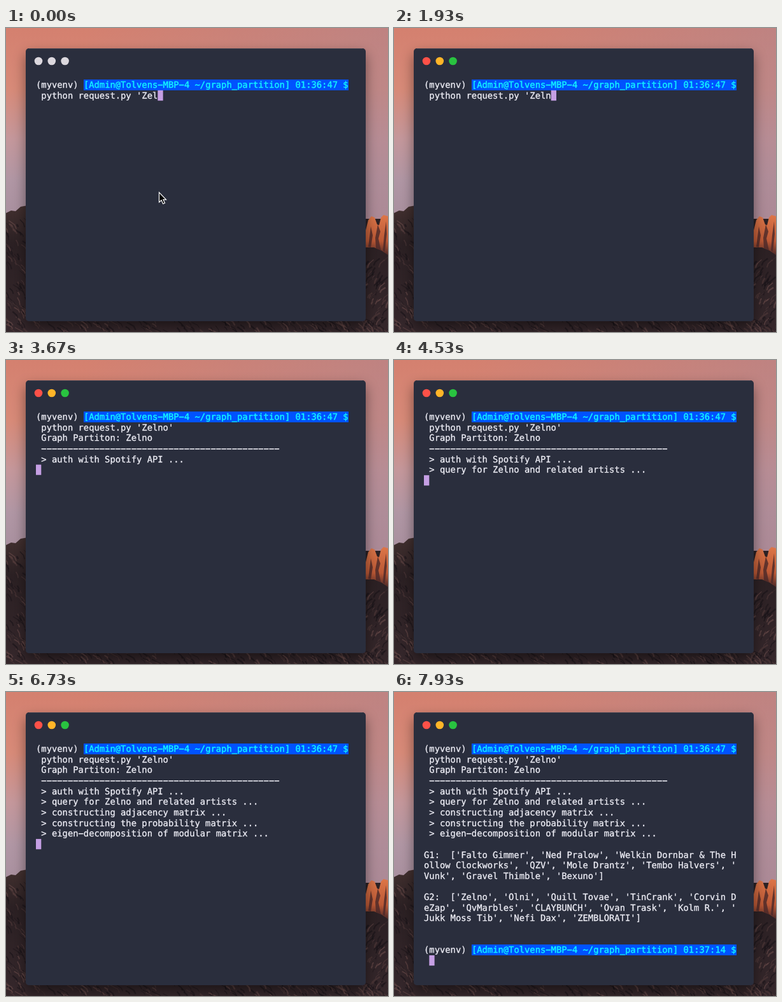
An HTML page that plays this animation: 600x478 px, repeating every 8 s.

```html
<!DOCTYPE html>
<html lang="en">
<head>
<meta charset="utf-8">
<title>Graph partition in a terminal</title>
<style>
  html, body { margin: 0; width: 100%; height: 100%; overflow: hidden; background: #2c2124; }
  svg { display: block; width: 600px; height: 478px; }
  text {
    font: 13.82px "DejaVu Sans Mono", monospace; white-space: pre; text-rendering: geometricPrecision;
    fill: #efeff7; stroke: #efeff7; stroke-width: .3px;
  }
  .prompt { fill: #12f0ff; stroke: #12f0ff; stroke-width: .45px; }
</style>
</head>
<body>
<svg id="stage" viewBox="0 0 600 478">
  <defs>
    <linearGradient id="sky" x2="0" y2="1">
      <stop offset="0" stop-color="#d4806f"/>
      <stop offset=".32" stop-color="#d78a78"/>
      <stop offset=".58" stop-color="#c4979b"/>
      <stop offset=".8" stop-color="#b096a4"/>
      <stop offset="1" stop-color="#a8909f"/>
    </linearGradient>
    <linearGradient id="dusk" x2="1" y2=".25">
      <stop offset=".2" stop-color="#b0858f" stop-opacity="0"/>
      <stop offset="1" stop-color="#ae8590" stop-opacity=".6"/>
    </linearGradient>
    <linearGradient id="rock" x2="0" y2="1">
      <stop offset="0" stop-color="#42302f"/>
      <stop offset=".3" stop-color="#2b2023"/>
      <stop offset="1" stop-color="#35272b"/>
    </linearGradient>
    <linearGradient id="cliff" x2="0" y2="1">
      <stop offset="0" stop-color="#dd7648"/>
      <stop offset=".65" stop-color="#bb5835"/>
      <stop offset="1" stop-color="#4c2927"/>
    </linearGradient>
    <filter id="shadow" x="-20%" y="-20%" width="140%" height="140%">
      <feDropShadow dx="0" dy="9" stdDeviation="10" flood-color="#000" flood-opacity=".45"/>
    </filter>
  </defs>
  <rect width="600" height="300" fill="url(#sky)"/>
  <rect width="600" height="300" fill="url(#dusk)"/>
  <path fill="url(#rock)" d="M0 291L8 287 15 288 23 281 34 279 120 330 480 340 566 342 600 349V478H0Z"/>
  <g id="streaks" fill="none"></g>
  <path fill="url(#cliff)" d="M560 345L565 318 569 302 574 296 579 298 583 309 586 310 589 298 593 294 600 296V357L590 350 578 345Z"/>
  <path fill="#4a2829" opacity=".8" d="M584 309L588 320 585 331 589 350 581 346 580 330ZM573 312L576 326 573 345 569 344ZM597 304L598 324 595 352 592 350 594 326Z"/>
  <rect x="31" y="32" width="534" height="429" rx="5" fill="#2a2e3e" filter="url(#shadow)"/>
  <path d="M36 32.5H560" stroke="#4a4d5b" stroke-width=".7"/>
  <g id="buttons"></g>
  <rect id="cursor" width="8.3" height="16.2" fill="#c59fe4"/>
  <g id="screen"></g>
  <path id="arrow" d="M0 0V15.5L3.6 12.2 6.2 18 9 16.8 6.4 11.3H11Z" fill="#000" stroke="#fff" stroke-width="1.2"/>
  <g id="beam" fill="none">
    <path d="M-4 -8.5Q0 -8.5 0 -5.5V5.5Q0 8.5 -4 8.5M4 -8.5Q0 -8.5 0 -5.5V5.5Q0 8.5 4 8.5M-2 2H2" stroke="#9da0aa" stroke-width="2.4"/>
    <path d="M-4 -8.5Q0 -8.5 0 -5.5V5.5Q0 8.5 -4 8.5M4 -8.5Q0 -8.5 0 -5.5V5.5Q0 8.5 4 8.5M-2 2H2" stroke="#0b0c11" stroke-width="1.2"/>
  </g>
</svg>
<script>
const LOOP = 8000, COLS = 59, LEFT = 47, TOP = 81.4, CHAR = 8.32, ROW = 16.63;
const FOCUS = 400, HIDE_POINTER = 1530, ENTER = 2730, RESULT = 7530;
const $ = id => document.getElementById(id);

function add(parent, tag, attrs, content = '') {
  const el = document.createElementNS('http://www.w3.org/2000/svg', tag);
  for (const key in attrs) el.setAttribute(key, attrs[key]);
  el.textContent = content;
  parent.append(el);
  return el;
}
const show = (el, on) => el.setAttribute('visibility', on ? 'visible' : 'hidden');

// Veins and cracks on the rock faces
let seed = 17;
const random = () => (seed = seed * 16807 % 2147483647) / 2147483647;
function streaks(count, x, y, w, h, slope) {
  for (let i = 0; i < count; i++) {
    const length = 4 + random() * 9;
    const dx = slope * length * (.4 + random());
    add($('streaks'), 'path', {
      d: `M${x + random() * w} ${y + random() * h}l${dx} ${length * .5}l${dx * .3} ${length * .5}`,
      stroke: ['#171217', '#1d161b', '#6a4c4b', '#513a3b'][Math.floor(random() * 4)],
      'stroke-width': .7 + random() * 1.8,
      opacity: .6
    });
  }
}
streaks(75, -3, 298, 34, 175, .6);
streaks(60, 564, 358, 38, 112, -.6);
streaks(170, 0, 456, 600, 20, .8);

const buttons = ['#fe5148', '#ffb528', '#29c340'].map((color, i) =>
  ({ color, el: add($('buttons'), 'circle', { cx: 51 + i * 20.8, cy: 52, r: 6.3 }) }));

// Hyphens are drawn at the wide terminal weight
const wide = s => s.replaceAll('-', '\u2212');
const put = (parent, row, col, s, cls = '') => add(parent, 'text',
  { x: LEFT + col * CHAR, y: TOP + 12.8 + row * ROW, class: cls }, wide(s));

const lines = [];
function line(time, row, s) {
  const g = add($('screen'), 'g', {});
  put(g, row, 0, s);
  lines.push({ time, g });
}
function prompt(time, row, clock) {
  const g = add($('screen'), 'g', {});
  const label = `[Admin@Tolvens-MBP-4 ~/graph_partition] ${clock} $`;
  add(g, 'rect', {
    x: LEFT + 9 * CHAR, y: TOP + row * ROW, width: label.length * CHAR, height: ROW,
    fill: '#0052ff', 'shape-rendering': 'crispEdges'
  });
  put(g, row, 0, '(myvenv)');
  put(g, row, 9, label, 'prompt');
  lines.push({ time, g });
}
function wrapped(time, row, s) {
  for (let i = 0; i < s.length; i += COLS) line(time, row++, s.slice(i, i + COLS));
}
const group = (name, members) => `${name}:  [${members.map(m => `'${m}'`).join(', ')}]`;

prompt(0, 0, '01:36:47');
const command = put($('screen'), 1, 0, '');
line(3200, 2, ' Graph Partiton: Zelno');
line(3200, 3, ' ' + '-'.repeat(45));
line(3270, 4, ' > auth with Spotify API ...');
line(4130, 5, ' > query for Zelno and related artists ...');
line(5000, 6, ' > constructing adjacency matrix ...');
line(5930, 7, ' > constructing the probability matrix ...');
line(6330, 8, ' > eigen-decomposition of modular matrix ...');
wrapped(RESULT, 10, group('G1', ['Falto Gimmer', 'Ned Pralow',
  'Welkin Dornbar & The Hollow Clockworks', 'QZV', 'Mole Drantz', 'Tembo Halvers',
  'Vunk', 'Gravel Thimble', 'Bexuno']));
wrapped(RESULT, 14, group('G2', ['Zelno', 'Olni', 'Quill Tovae', 'TinCrank', 'Corvin DeZap',
  'QvMarbles', 'CLAYBUNCH', 'Ovan Trask', 'Kolm R.', 'Jukk Moss Tib', 'Nefi Dax', 'ZEMBLORATI']));
prompt(RESULT, 19, '01:37:14');

const fullCommand = " python request.py 'Zelno'";
const keyTimes = [1730, 2130, 2400];
// time, row, column of the block cursor once the command runs
const cursorSteps = [[ENTER, 2, 0], [3200, 4, 0], [3270, 5, 0], [4130, 6, 0], [5000, 7, 0],
  [5930, 8, 0], [6330, 9, 0], [RESULT, 20, 1]];

function draw(t) {
  const typed = fullCommand.slice(0, fullCommand.length - 3 + keyTimes.filter(k => t >= k).length);
  if (command.textContent !== typed) command.textContent = typed;
  for (const { time, g } of lines) show(g, t >= time);

  const [, row, col] = cursorSteps.findLast(step => t >= step[0]) || [0, 1, typed.length];
  $('cursor').setAttribute('x', LEFT + col * CHAR);
  $('cursor').setAttribute('y', TOP + row * ROW);

  const focused = t >= FOCUS;
  for (const { el, color } of buttons) el.setAttribute('fill', focused ? color : '#dcd8de');

  const p = Math.min(1, Math.max(0, (t - 470) / 400));
  const ease = p * p * (3 - 2 * p);
  const place = `translate(${240.5 - 4.5 * ease} ${258.5 - 65.5 * ease})`;
  $('arrow').setAttribute('transform', place);
  $('beam').setAttribute('transform', place);
  show($('arrow'), !focused);
  show($('beam'), focused && t < HIDE_POINTER);
}

const start = performance.now();
function tick() {
  draw((performance.now() - start) % LOOP);
  requestAnimationFrame(tick);
}
tick();
</script>
</body>
</html>
```
